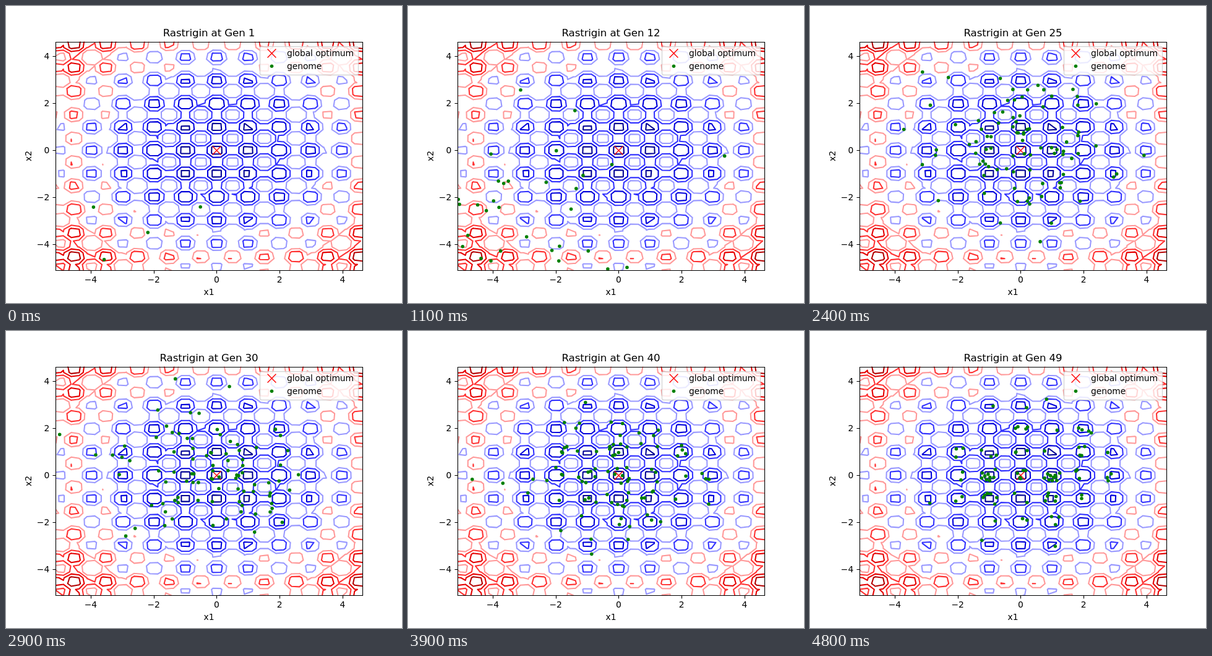
An HTML page for the animation above (4.9 s loop, 640 by 480 pixels).

```html
<!DOCTYPE html>
<html lang="en">
<head>
<meta charset="utf-8">
<title>Evolution on a contour plot</title>
<style>
  html, body { margin: 0; width: 100%; height: 100%; overflow: hidden; background: #fff; }
  svg { display: block; width: 640px; height: 480px; }
  text { font: 13.889px "DejaVu Sans", sans-serif; fill: #000; }
  #title { font-size: 16.667px; letter-spacing: -.13px; }
  .key { letter-spacing: -.08px; }
  .mid { text-anchor: middle; }
  .end { text-anchor: end; }
  #contours { fill: none; stroke-width: 2.083; stroke-linecap: round; stroke-linejoin: round; }
  #axes { fill: none; stroke: #000; stroke-width: 1.111; }
  .cross { fill: none; stroke: #f00; stroke-width: 1.389; }
  .dot { fill: none; stroke: #008000; stroke-width: 5.56; stroke-linecap: round; }
</style>
</head>
<body>
<svg viewBox="0 0 640 480">
  <clipPath id="view"><rect x="80" y="57.6" width="496" height="369.6"/></clipPath>
  <g clip-path="url(#view)">
    <g id="contours"></g>
    <path class="cross" id="optimum"/>
    <path class="dot" id="genomes"/>
  </g>
  <path id="axes"/>
  <g id="labels"></g>
  <text id="title" class="mid" x="328" y="49"></text>
  <text class="mid" x="328" y="467">x1</text>
  <text class="mid" transform="translate(41 242.4) rotate(-90)">x2</text>
  <rect x="410.5" y="65.5" width="159" height="46" rx="2.8" fill="#fff" fill-opacity=".8"
    stroke="#ccc" stroke-opacity=".8" stroke-width="1.389"/>
  <path class="cross" id="keyCross"/>
  <path class="dot" d="M429.5 97.2h0"/>
  <text class="key" x="454" y="81">global optimum</text>
  <text class="key" x="454" y="102">genome</text>
</svg>
<script>
const byId = id => document.getElementById(id);
const LOW = -5.12, STEP = 0.25, COUNT = 40, SPAN = STEP * (COUNT - 1);
const px = x => 80 + (x - LOW) / SPAN * 496;
const py = y => 427.2 - (y - LOW) / SPAN * 369.6;

function add(parent, tag, attrs, text = '') {
  const el = document.createElementNS('http://www.w3.org/2000/svg', tag);
  for (const key in attrs) el.setAttribute(key, attrs[key]);
  el.textContent = text;
  parent.append(el);
}

// Contour lines of the sampled function
const wave = v => v * v + 10 - 10 * Math.cos(2 * Math.PI * v);
const height = (i, j) => wave(LOW + i * STEP) + wave(LOW + j * STEP);

// Dark blue, blue, white, red, dark red
function colour(t) {
  const ramp = t < .25 ? [0, 0, .3 + 2.8 * t]
    : t < .5 ? [4 * t - 1, 4 * t - 1, 1]
    : t < .75 ? [1, 3 - 4 * t, 3 - 4 * t]
    : [2.5 - 2 * t, 0, 0];
  return `rgb(${ramp.map(c => Math.round(c * 255))})`;
}

function contour(level) {
  let d = '';
  const line = (p, q) => { d += `M${p}L${q}`; };
  for (let i = 0; i < COUNT - 1; i++) for (let j = 0; j < COUNT - 1; j++) {
    const corners = [[i, j], [i + 1, j], [i + 1, j + 1], [i, j + 1]];
    const z = corners.map(c => height(...c));
    const cuts = [];
    corners.forEach(([a, b], k) => {
      const n = (k + 1) % 4, [c, e] = corners[n];
      if (z[k] > level === z[n] > level) return;
      const f = (level - z[k]) / (z[n] - z[k]);
      cuts.push([px(LOW + (a + f * (c - a)) * STEP).toFixed(2),
                 py(LOW + (b + f * (e - b)) * STEP).toFixed(2)]);
    });
    if (cuts.length === 2) line(cuts[0], cuts[1]);
    if (cuts.length === 4) {
      const mean = (z[0] + z[1] + z[2] + z[3]) / 4;
      const joined = z[0] > level === mean > level;
      line(cuts[0], cuts[joined ? 1 : 3]);
      line(cuts[2], cuts[joined ? 3 : 1]);
    }
  }
  return d;
}

for (let level = 8; level < 80; level += 8)
  add(byId('contours'), 'path', { d: contour(level), stroke: colour(level / 80) });

// Frame, ticks and markers
const snap = v => Math.floor(v + .5) + .5;
let axes = 'M80.5 58.5H576.5V427.5H80.5Z';
for (let v = -4; v <= 4; v += 2) {
  const label = String(v).replace('-', '\u2212');
  axes += `M${snap(px(v))} 427.5v5M80.5 ${snap(py(v))}h-5`;
  add(byId('labels'), 'text', { class: 'mid', x: px(v), y: 447 }, label);
  add(byId('labels'), 'text', { class: 'end', x: 70.3, y: Math.round(py(v) + 5) }, label);
}
byId('axes').setAttribute('d', axes);
const cross = (x, y) => `M${x - 6.94} ${y - 6.94}l13.88 13.88m0 -13.88l-13.88 13.88`;
byId('optimum').setAttribute('d', cross(340.5, 233.5));
byId('keyCross').setAttribute('d', cross(429.5, 76.5));

function randomFrom(seed) {
  return () => {
    seed = seed + 0x6D2B79F5 | 0;
    let t = Math.imul(seed ^ seed >>> 15, 1 | seed);
    t = t + Math.imul(t ^ t >>> 7, 61 | t) ^ t;
    return ((t ^ t >>> 14) >>> 0) / 4294967296;
  };
}

// The population starts beyond the lower left corner, drifts to the optimum,
// then gathers in the valleys at whole numbers.
const GENERATIONS = 49, SIZE = 90;
function population(gen) {
  const age = (gen - 1) / (GENERATIONS - 1);
  const away = 1 / (1 + Math.exp((gen - 13) / 2.5));
  const centre = -7.5 * away;
  const spread = 1.7 - .5 * age ** 2 + 2 * away;
  const pull = .5 * age ** 3;
  const rnd = randomFrom(gen * 7919);
  const place = () => {
    const bell = Math.sqrt(-2 * Math.log(1 - rnd())) * Math.cos(2 * Math.PI * rnd());
    const v = centre + spread * bell;
    return v + (Math.round(v) - v) * pull;
  };
  let d = '';
  for (let k = 0; k < SIZE; k++)
    d += `M${px(place()).toFixed(1)} ${py(place()).toFixed(1)}h0`;
  return d;
}

let shown = 0;
function frame() {
  const gen = Math.floor(performance.now() / 100) % GENERATIONS + 1;
  if (gen !== shown) {
    shown = gen;
    byId('title').textContent = `Rastrigin at Gen ${gen}`;
    byId('genomes').setAttribute('d', population(gen));
  }
  requestAnimationFrame(frame);
}
frame();
</script>
</body>
</html>
```
